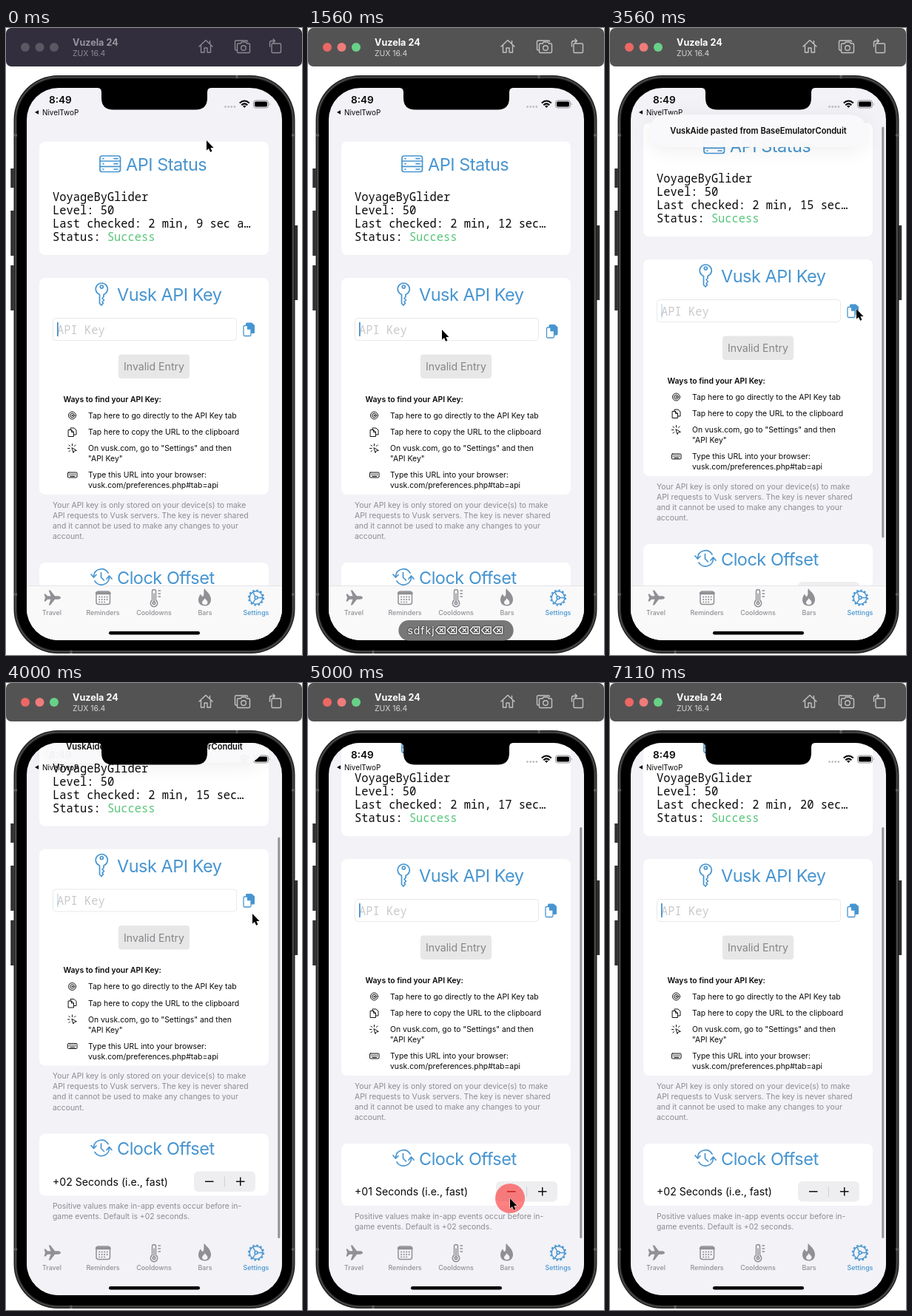
Animation of 400x848 px, one loop 7.61 s. Source, as an HTML page:

```html
<!DOCTYPE html>
<html lang="en">
<head>
<meta charset="utf-8">
<title>Settings demo</title>
<style>
html, body { margin: 0; width: 100%; height: 100%; overflow: hidden; background: #fff; }
svg { display: block; width: 400px; height: 848px; }
text { font: 10.4px Inter, sans-serif; fill: #080808; white-space: pre; }
.mid { text-anchor: middle; }
.title { font-size: 23.5px; letter-spacing: -.5px; fill: #4795d0; }
.mono { font: 15.4px "Noto Sans Mono", monospace; }
.note { fill: #8b8b91; }
.bold { font-weight: 600; }
.big { font-size: 14.1px; }
.tab { font-size: 8.9px; font-weight: 500; text-anchor: middle; fill: #909095; }
.tab.on { fill: #4795d0; }
.line { fill: none; stroke-linecap: round; stroke-linejoin: round; }
.blue { stroke: #4795d0; stroke-width: 1.7; }
.thin { stroke: #111; stroke-width: 1; }
.card { fill: #fff; }
#glow { fill: #d01010; mix-blend-mode: lighten; }
</style>
</head>
<body>
<svg viewBox="0 0 400 848">
  <defs>
    <clipPath id="screen"><rect x="28" y="81" width="345" height="747" rx="43"/></clipPath>
    <g id="del" class="line" stroke="#fff" stroke-width="1.4">
      <path d="M1 0L5 -4.5H13.5V4.5H5ZM6.5 -2.3L11 2.3M11 -2.3L6.5 2.3"/>
    </g>
  </defs>

  <!-- window bar -->
  <rect id="bar" width="400" height="52" rx="7"/>
  <g id="lights"><circle cx="26" cy="26" r="6"/><circle cx="45.5" cy="26" r="6"/><circle cx="65" cy="26" r="6"/></g>
  <text id="device" class="bold" x="90" y="23.5" style="font-size:12.6px;font-weight:700">Vuzela 24</text>
  <text id="system" x="90" y="38">ZUX 16.4</text>
  <g id="tools" class="line" stroke-width="1.4">
    <path d="M261 25L270 16.5L279 25M263.5 23.5V33H268V27H272V33H276.5V23.5M275.5 21V17.5"/>
    <path d="M312 30H311Q309.5 30 309.5 28.5V18.5Q309.5 17 311 17H325Q326.5 17 326.5 18.5"/>
    <path d="M314 21H317L318.5 19H324L325.5 21H328Q329.5 21 329.5 22.5V32Q329.5 33.5 328 33.5H314Q312.5 33.5 312.5 32V22.5Q312.5 21 314 21Z"/>
    <circle cx="321" cy="27" r="3.3"/>
    <rect x="359" y="21" width="12.5" height="12.5" rx="1.5"/>
    <path d="M356.5 25V20Q356.5 17.5 359 17.5H363M361 15L363.5 17.5L361 20"/>
  </g>

  <!-- phone body -->
  <path d="M8.5 190V216M8.5 247V308M8.5 321V382M392 267V368" stroke="#303030" stroke-width="4.5"/>
  <rect x="10.5" y="64" width="380" height="782" rx="60" fill="#1e1e1e"/>
  <rect x="13" y="66.5" width="375" height="777" rx="57.5" fill="none" stroke="#484848" stroke-width="2"/>
  <path d="M11 145H15.5M386 145H390.5M11 766H15.5M386 766H390.5M312 64V68.500M88 841.500V846" stroke="#5c5c5c" stroke-width="3"/>
  <rect x="15" y="68.5" width="371" height="773" rx="55.5" fill="#000"/>

  <g clip-path="url(#screen)">
    <rect x="28" y="81" width="345" height="747" fill="#f2f2f7"/>
    <g id="page">
      <rect class="card" x="45" y="153.5" width="310" height="153.5" rx="8"/>
      <g class="line blue">
        <rect x="127" y="173" width="27.5" height="21.5" rx="3"/>
        <path d="M127 180H154.5M127 187.3H154.5M131 176.6H132M131 183.6H132M131 191H132M146 176.6H151M146 183.6H151M146 191H151"/>
      </g>
      <text class="title" x="162" y="192.5">API Status</text>
      <text class="mono" x="63" y="234">VoyageByGlider</text>
      <text class="mono" x="63" y="252">Level: 50</text>
      <text id="checked" class="mono" x="63" y="270"></text>
      <text class="mono" x="63" y="288">Status: <tspan fill="#58c67b">Success</tspan></text>

      <rect id="keyCard" class="card" x="45" y="338" width="310" height="293" rx="8"/>
      <g class="line blue">
        <path d="M126.5 360.5A8 8 0 1 1 132 360.5V363.5L130 365.5L132.5 368L130 370.5L131.5 372L129 375L126.5 372.5Z"/>
        <circle cx="129.3" cy="350" r="2"/>
      </g>
      <text class="title" x="150" y="369">Vusk API Key</text>
      <rect id="field" x="63.5" y="392.5" width="248" height="30" rx="4" fill="#fff" stroke="#e9e9eb"/>
      <text id="entry" class="mono" x="69" y="413.5"></text>
      <rect id="caret" x="69" y="398" width="1.7" height="19" fill="#3f8dcc"/>
      <g id="paste">
        <path d="M325.5 398.5H332L336 402V411.5Q336 413 334.5 413H325.5Q324 413 324 411.5V400Q324 398.5 325.5 398.5Z" fill="#4795d0"/>
        <path d="M322.5 402.5H326.5L331 407V415Q331 416.5 329.5 416.5H322.5Q321 416.5 321 415V404Q321 402.5 322.5 402.5ZM326.5 402.5V407H331" fill="#fff" stroke="#4795d0" stroke-width="1.3"/>
      </g>
      <g id="clear" class="line blue" style="stroke-width:1.3">
        <rect x="322.5" y="401.5" width="12.5" height="12.5" rx="2"/>
        <path d="M326 405L331.5 410.5M331.5 405L326 410.5"/>
      </g>
      <rect id="button" rx="4" fill="#e7e7e8"/>
      <text id="label" class="mid big" x="200"></text>

      <g id="lower">
        <text class="bold" x="77.5" y="505.7">Ways to find your API Key:</text>
        <g class="line thin">
          <circle cx="89.5" cy="524" r="5"/><circle cx="89.5" cy="524" r="2.8"/><circle cx="89.5" cy="524" r=".7"/>
          <path d="M87 543.5V541H92L95 544V550H91.5M84.5 543.5H88.5L91.5 546.5V552.5H84.5ZM88.5 543.5V546.5H91.5"/>
          <path d="M89 568L91 574.5L92.3 572L95 571.5ZM89.5 562.5V565M85 564L86.5 565.5M94 564L92.5 565.5M83.5 568.5H86M85 573L86.5 571.5"/>
          <rect x="83.5" y="601" width="12.5" height="7" rx="1"/>
          <path d="M85.5 603H94M85.5 604.7H94" stroke-dasharray=".3 1.7"/><path d="M87 606.4H92.5"/>
        </g>
        <text x="111" y="527.7">Tap here to go directly to the API Key tab</text>
        <text x="111" y="550.2">Tap here to copy the URL to the clipboard</text>
        <text x="111" y="572.2">On vusk.com, go to "Settings" and then</text>
        <text x="111" y="586.2">"API Key"</text>
        <text x="111" y="608.2">Type this URL into your browser:</text>
        <text x="111" y="622.2">vusk.com/preferences.php#tab=api</text>
        <text class="note" x="63" y="648.5">Your API key is only stored on your device(s) to make</text>
        <text class="note" x="63" y="662.7">API requests to Vusk servers. The key is never shared</text>
        <text class="note" x="63" y="676.9">and it cannot be used to make any changes to your</text>
        <text class="note" x="63" y="691.1">account.</text>

        <rect class="card" x="45" y="723" width="310" height="84" rx="8"/>
        <g class="line blue">
          <path d="M118.5 741A10.5 10.5 0 0 1 138 737M139.5 743A10.5 10.5 0 0 1 120 748M128.5 736.5V743L132.5 747M115 739L118.5 743L122 739.5M136 745L139.5 741L143 745"/>
        </g>
        <text class="title" x="150" y="751.5">Clock Offset</text>
        <text id="offset" class="big" x="63" y="793"></text>
        <rect x="254" y="774" width="83" height="27.5" rx="6" fill="#eeeef0"/>
        <path d="M295.5 781V795" stroke="#d2d2d6"/>
        <rect id="pressed" y="774" width="41.5" height="27.5" rx="6" fill="#c9c9cb"/>
        <path d="M269 787.7H280.5M311 787.7H322.5M316.75 782V793.5" stroke="#111" stroke-width="1.5"/>
        <text class="note" x="63" y="824.5">Positive values make in-app events occur before in-</text>
        <text class="note" x="63" y="838.7">game events. Default is +02 seconds.</text>
      </g>
    </g>
    <rect id="scroller" x="367.3" width="3" rx="1.5" fill="#929296"/>

    <!-- tab bar -->
    <rect x="28" y="754" width="345" height="74" fill="#f2f2f7"/>
    <g id="tabBack"><rect x="28" y="754" width="345" height="74" fill="#f9f9fa"/><path d="M28 754.5H373" stroke="#e4e4e7"/></g>
    <g fill="#909095">
      <path transform="translate(62.5 770.5)" d="M11.5 0C11.5 -1.6 9 -2.2 7.5 -2.2H3.5L-2.5 -10H-4.8L-2 -2.2H-6.5L-9 -5H-11L-9.5 0L-11 5H-9L-6.5 2.2H-2L-4.8 10H-2.5L3.5 2.2H7.5C9 2.2 11.5 1.6 11.5 0Z"/>
      <path d="M268 758C271 762 277 766 277 773C277 779 273 781.5 268.5 781.5C263.5 781.5 260 778.5 260 773.5C260 770 261.5 767.5 263 765.5C264 768 265 769 266 769C268.5 767 266.5 761.5 268 758ZM268.5 771C268 774 265 774.5 265 777C265 779 266.5 780 268.5 780C271 780 272.5 779 272.5 777C272.5 774.5 270 773.5 268.5 771Z" fill-rule="evenodd"/>
      <g class="line" stroke="#909095" stroke-width="1.5">
        <rect x="122" y="762" width="18.5" height="17.5" rx="3"/><path d="M122.5 764.5H140" stroke-width="3.5"/>
        <path d="M126 769.5H138M126 773H138M126 776.3H134" stroke-width="1.8" stroke-dasharray=".3 3.2"/>
        <path d="M197.5 774V762Q197.5 759.5 200 759.5T202.5 762V774A4.7 4.7 0 1 1 197.5 774ZM200 765V777M206 761H208.5M206 765H208.5M206 769H208.5"/>
        <circle cx="200" cy="777.7" r="1.8"/>
      </g>
    </g>
    <g class="line" stroke="#4795d0" stroke-width="1.4">
      <circle cx="338" cy="770.5" r="8.8"/>
      <circle cx="338" cy="770.5" r="10.2" stroke-width="1.8" stroke-linecap="butt" stroke-dasharray="2.67 2.67"/>
      <circle cx="338" cy="770.5" r="2"/>
      <path d="M340 770.5H346.5M337 768.8L333.7 763.2M337 772.2L333.7 777.8"/>
    </g>
    <text class="tab" x="62" y="794">Travel</text>
    <text class="tab" x="131" y="794">Reminders</text>
    <text class="tab" x="200" y="794">Cooldowns</text>
    <text class="tab" x="269" y="794">Bars</text>
    <text class="tab on" x="338" y="794">Settings</text>
    <rect x="139" y="816" width="123" height="4.5" rx="2.25" fill="#000"/>

    <!-- status bar -->
    <text class="bold" x="58" y="101.7" style="font-size:13.6px">8:49</text>
    <path d="M39 114L44 111.2V116.8Z"/>
    <text x="49" y="117.5" style="font-size:9.9px">NivelTwoP</text>
    <path d="M296.5 106.5H311" class="line" stroke="#b5b5ba" stroke-width="2.6" stroke-dasharray=".1 4"/>
    <path d="M315.8 101.5Q322.3 95.5 328.8 101.5M318.3 104.2Q322.3 100.5 326.3 104.2" fill="none" stroke="#000" stroke-width="2.1"/>
    <path d="M320 105.6Q322.3 103.8 324.6 105.6L322.3 108Z"/>
    <rect x="334.5" y="98" width="20" height="10" rx="3" fill="none" stroke="#8e8e90"/>
    <rect x="336" y="99.5" width="17" height="7" rx="1.7"/><path d="M356 101.3Q357.8 103 356 104.8Z" fill="#8e8e90"/>

    <g id="banner">
      <rect x="53" y="-22" width="294" height="44" rx="22" fill="#f9f9fb" fill-opacity=".97" style="filter:drop-shadow(0 4px 13px rgba(0,0,0,.07))"/>
      <text class="mid bold" x="200.5" y="4" style="font-size:11.1px">VuskAide pasted from BaseEmulatorConduit</text>
    </g>
  </g>
  <path d="M124 80V81Q129 81 129 87V94.5Q129 110.5 145 110.5H256Q272 110.5 272 94.5V87Q272 81 277 81V80Z"/>

  <g id="pill">
    <rect y="801" height="27.5" rx="13.5" fill="#777"/>
    <g style="filter:drop-shadow(0 0 1px #000)">
      <text y="819.5" style="font-size:14px;fill:#fff;letter-spacing:1px"></text>
      <g id="dels"></g>
    </g>
  </g>
  <circle id="ring" fill="#ff2828" fill-opacity=".58"/>
  <circle id="core" fill="#ff1c1c" fill-opacity=".7"/>
  <circle id="glow"/>
  <path id="pointer" d="M0 0V13.5L3 10.9L5.1 15.7L7.4 14.7L5.4 10H9.5Z" stroke="#fff" stroke-width="1" paint-order="stroke"/>
</svg>
<script>
const $ = id => document.getElementById(id);
const set = (el, attrs) => { for (const k in attrs) el.setAttribute(k, attrs[k]); };
const show = (el, on) => el.setAttribute('visibility', on ? 'visible' : 'hidden');
const move = (el, x, y) => el.setAttribute('transform', `translate(${x} ${y})`);
const clamp = (v, lo, hi) => Math.min(hi, Math.max(lo, v));

const LOOP = 7610, STEP = 1000 / 9, LAST = 64;

// Rows are [step, ...values]; values are interpolated linearly.
const path = [[0, 271, 152], [2, 245, 260], [4, 200, 425], [7, 190, 425], [10, 38, 422], [11, 40, 421],
  [14, 181, 408], [17, 310, 412], [19, 332, 411], [25, 333, 410], [30, 333, 410], [33, 333, 365], [36, 333, 312],
  [38, 303, 540], [40, 273, 697], [51, 273, 697], [54, 322, 690], [55, 326, 688]];
const scrolling = [[30, 0], [31, 6], [32, 25], [33, 55], [34, 85], [35, 105], [36, 113.5], [37, 109], [38, 104], [39, 101], [40, 100]];
const bannerY = [[21, 45], [22, 70], [23, 108], [24, 131], [25, 139], [33, 139], [34, 136], [35, 117], [36, 86], [37, 58], [38, 45]];
const clicks = [4, 21, 27, 44, 47, 50, 56, 59, 61];
const typed = ['sd', 'sdfk', 'sdfkj', 'sdfkj', 'sdf', 's'];
const offsets = [[45, 1], [48, 0], [51, -1], [57, 0], [60, 1], [63, 2]];

function at(rows, n) {
  const i = rows.findIndex(r => r[0] > n);
  if (i === 0) return rows[0].slice(1);
  if (i < 0) return rows[rows.length - 1].slice(1);
  const a = rows[i - 1], b = rows[i], k = (n - a[0]) / (b[0] - a[0]);
  return a.slice(1).map((v, j) => v + (b[j + 1] - v) * k);
}

function offsetText(n) {
  const v = offsets.reduce((last, [from, value]) => n >= from ? value : last, 2);
  const tail = v > 0 ? ' (i.e., fast)' : v < 0 ? ' (i.e., slow)' : '';
  return (v < 0 ? '-' : '+') + '0' + Math.abs(v) + ' Seconds' + tail;
}

function drawBar(active) {
  $('bar').style.fill = active ? '#545353' : '#322e3d';
  $('device').style.fill = active ? '#fff' : '#98959f';
  $('system').style.fill = active ? '#d6d6d6' : '#8e8b95';
  $('tools').style.stroke = active ? '#c2c2c2' : '#8c8993';
  ['#ed6765', '#ee7c7b', '#68d188'].forEach((c, i) => $('lights').children[i].style.fill = active ? c : '#5b5863');
}

function drawEntry(n, sec) {
  const pasted = n >= 22 && n < 28;
  const value = pasted ? 'NotTheRealKeyAAA' : typed[n - 8] || '';
  const entry = $('entry');
  entry.textContent = value || 'API Key';
  entry.style.fill = value ? '#080808' : '#cacacd';
  const blink = .4 + 1.2 * Math.cos(2 * Math.PI * (sec / .645 - .89));
  const typing = n < 2 || n >= 8 && n < 16;
  set($('caret'), { x: 69 + (value ? entry.getComputedTextLength() : 0), opacity: typing ? 1 : clamp(blink, .25, 1) });
  set($('field'), { width: pasted ? 250 : 248 });
  show($('paste'), !value);
  show($('clear'), value);
  move($('paste'), n === 14 ? 1.5 : 0, n === 14 ? 2.5 : 0);

  const lift = pasted ? 2.5 : 0, w = pasted ? 62 : 96;
  set($('button'), { x: 200 - w / 2, y: 441.5 - lift, width: w, height: 32.5 });
  set($('label'), { y: 463 - lift });
  $('label').textContent = pasted ? 'Submit' : 'Invalid Entry';
  $('label').style.fill = pasted ? '#080808' : '#858587';
  set($('keyCard'), { height: 293 - lift });
  move($('lower'), 0, -lift);
}

function drawPill(n) {
  const pill = $('pill'), box = pill.querySelector('rect'), text = pill.querySelector('text');
  show(pill, n >= 8 && n < 26);
  text.textContent = typed[Math.min(n - 8, 2)] || '';
  const count = clamp((n - 11) * 2, 0, 6);
  const textWidth = text.getComputedTextLength();
  const width = textWidth + count * 15.5 + 25, x = 200 - width / 2;
  set(box, { x, width });
  set(text, { x: x + 12 });
  $('dels').innerHTML = Array.from({ length: count }, (_, i) =>
    `<use href="#del" x="${x + 12 + textWidth + i * 15.5}" y="814.5"/>`).join('');
}

function drawPointer(n) {
  const [cx, cy] = at(path, n);
  const down = clicks.includes(n), up = clicks.includes(n - 1);
  const r = n >= 62 ? 0 : down ? 22 : up ? 20 : 0;
  move($('pointer'), cx, cy);
  show($('pointer'), n < 62);
  set($('ring'), { cx, cy, r });
  set($('glow'), { cx, cy, r });
  set($('core'), { cx, cy, r: down ? 14 : 0 });
  set($('pressed'), { x: n < 54 ? 254 : 295.5, opacity: n > 42 && (down || n === 62) ? 1 : 0 });
}

function draw(ms) {
  const n = Math.min(LAST, Math.floor((ms + 5) / STEP)), sec = n * STEP / 1000;
  drawBar(n >= 4);
  const age = Math.floor(9.72 + 1.55 * sec);
  $('checked').textContent = `Last checked: 2 min, ${age} sec${age < 10 ? ' a' : ''}…`;
  drawEntry(n, sec);
  $('offset').textContent = offsetText(n);

  const [scroll] = at(scrolling, n);
  move($('page'), 0, -scroll);
  const top = scroll > 100 ? 95 + scroll : 113 + .82 * scroll;
  set($('scroller'), { y: top, height: Math.min(556, 751 - top) });
  show($('scroller'), n > 30);
  set($('tabBack'), { opacity: clamp((100 - scroll) / 15, 0, 1) });

  const [y] = at(bannerY, n);
  move($('banner'), 0, y);
  show($('banner'), n >= 22 && n < 38);
  drawPill(n);
  drawPointer(n);
}

function tick() {
  draw(performance.now() % LOOP);
  requestAnimationFrame(tick);
}
tick();
</script>
</body>
</html>
```
